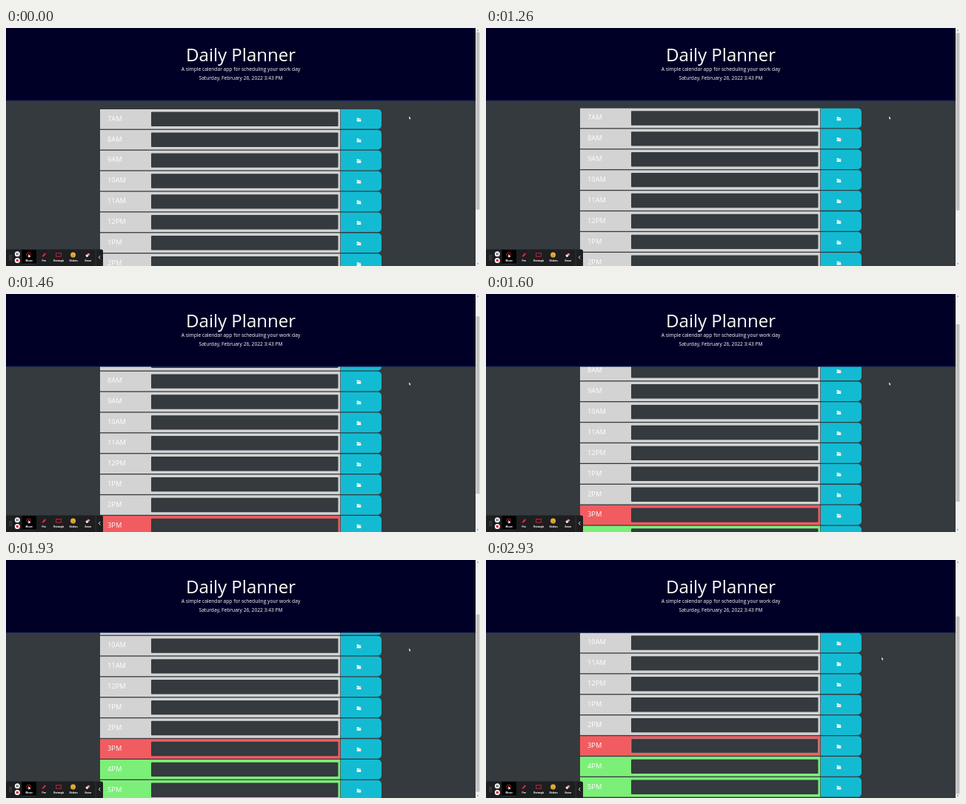
An HTML page for the animation above (3.4 s loop, 640 by 322 pixels).

```html
<!DOCTYPE html>
<html lang="en">
<head>
<meta charset="utf-8">
<title>Daily Planner</title>
<style>
  html, body { margin: 0; width: 100%; height: 100%; overflow: hidden; background: #343a3e; }
  svg { display: block; width: 100%; height: 100%; font-family: "Open Sans", "Noto Sans", sans-serif; fill: #fff; }
  .centered { text-anchor: middle; }
  .title { font-size: 24px; }
  .lead { font-size: 6.67px; }
  .hour { font-size: 9.33px; }
  .tool { font: 700 3.1px Roboto, Inter, sans-serif; text-anchor: middle; }
  .past { fill: #d3d3d3; }
  .present { fill: #f15c60; }
  .future { fill: #7cef78; }
  .field { fill: #343a3e; }
  .save { fill: #13bbd2; }
</style>
</head>
<body>
<svg viewBox="0 0 640 322">
  <defs>
    <linearGradient id="edge" x2="0" y2="1">
      <stop stop-color="#0a1c52"/>
      <stop offset="1" stop-color="#0a1c52" stop-opacity="0"/>
    </linearGradient>
    <path id="folder" d="M473.7 11.7h2.2l.7.8h2.5v1h-5.4zM473.7 14h5.6v2.6h-5.6z"/>
  </defs>

  <rect width="640" height="322" fill="#343a3e"/>
  <g id="rows"></g>

  <rect width="634" height="98" fill="#000027"/>
  <rect y="97.5" width="634" height="2" fill="url(#edge)"/>
  <g class="centered">
    <text class="title" x="317" y="45">Daily Planner</text>
    <text class="lead" x="317" y="58">A simple calendar app for scheduling your work day</text>
    <text class="lead" x="317" y="70">Saturday, February 26, 2022 3:43 PM</text>
  </g>

  <g id="scrollbar">
    <rect x="634" width="6" height="322" fill="#f1f1f1"/>
    <path d="M635.8 3.6l1.2-1.4 1.2 1.4zM635.8 318.4l1.2 1.4 1.2-1.4z" fill="#505050"/>
    <rect id="thumb" x="634.6" y="5.7" width="4.8" height="240" fill="#c1c1c1"/>
  </g>

  <g id="toolbar">
    <path d="M0 299.5H128.500a2.500 2.500 0 0 1 2.500 2.500V322H0z" fill="#1d1e20"/>
    <path d="M5 307v7.500M7.200 307v7.500" stroke="#85878a" stroke-width=".9" stroke-dasharray=".9 1.200"/>
    <circle cx="15.300" cy="305.800" r="3.500"/>
    <path d="M14.500 304.300v3M16.200 304.300v3" stroke="#222" stroke-width=".9"/>
    <circle cx="15.300" cy="314.500" r="3.500"/>
    <rect x="13.700" y="312.900" width="3.200" height="3.200" rx=".5" fill="#d8232f"/>
    <rect x="21.500" y="300" width="19.500" height="19" rx="1" fill="#000"/>
    <path d="M22 319.200h18.500" stroke="#43536b" stroke-width=".6"/>
    <circle cx="30.600" cy="306.700" r="2.800" fill="none" stroke="#d9303c" stroke-width=".8"/>
    <path d="M30.300 305.800v5l1.200-1.100 1.900-.1z"/>
    <path d="M48.700 309.700l.5-2 3.400-3.400 1.500 1.500-3.400 3.400z" fill="#e2263c"/>
    <rect x="67.700" y="304.600" width="6.600" height="4.600" fill="none" stroke="#c91f31" stroke-width="1"/>
    <circle cx="90.600" cy="307" r="3.400" fill="#f4b83b"/>
    <path d="M88.800 307.600q1.800 2.300 3.600 0" fill="none" stroke="#77451b" stroke-width=".7"/>
    <path d="M89.400 305.400v.8M91.800 305.400v.8" stroke="#583415" stroke-width=".7"/>
    <path d="M107.500 307.800l3.800-3.300 2.300 1.800-3.800 3.400h-1.200z" fill="#ef8b9b"/>
    <path d="M107.500 307.800l1.600-1.400 2.200 2-1.400 1.300h-1.200z" fill="#eee"/>
    <g class="tool">
      <text x="31.200" y="315.500">Mouse</text>
      <text x="51.300" y="315.500">Pen</text>
      <text x="71.200" y="315.500">Rectangle</text>
      <text x="91.200" y="315.500">Stickers</text>
      <text x="111" y="315.500">Eraser</text>
    </g>
    <path d="M121.200 300v22" stroke="#44464a" stroke-width=".6"/>
    <path d="M127.300 308l-2 2.200 2 2.200" fill="none" stroke="#fff" stroke-width=".9"/>
  </g>

  <path id="cursor" d="M0 0v4.300l1-.9.7 1.500.7-.3-.7-1.500h1.400z" stroke="#222" stroke-width=".35"/>
</svg>

<script>
  const LOOP = 3400;
  const FPS = 15;
  const ROW_PITCH = 27.9;
  const MAX_SCROLL = 95;
  const byId = id => document.getElementById(id);
  const clamp = v => Math.min(1, Math.max(0, v));
  const progress = (t, from, to) => clamp((t - from) / (to - from));
  const smooth = p => p * p * (3 - 2 * p);

  function rowMarkup(hour, index) {
    const state = hour < 15 ? "past" : hour === 15 ? "present" : "future";
    const label = (hour > 12 ? hour - 12 : hour) + (hour < 12 ? "AM" : "PM");
    return `<g transform="translate(0 ${110 + index * ROW_PITCH})">
      <rect class="${state}" x="127" width="324.3" height="26.6"/>
      <text class="hour" x="137" y="15.700">${label}</text>
      <rect class="field" id="field${hour}" x="196" y="3.600" width="252.500" height="19.400" rx="1"/>
      <path class="save" d="M452 0h50a5 5 0 0 1 5 5v16.600a5 5 0 0 1-5 5h-50z"/>
      <use href="#folder"/>
    </g>`;
  }

  byId("rows").innerHTML = Array.from({ length: 11 }, (_, i) => rowMarkup(i + 7, i)).join("");

  // Three wheel ticks; the last one reaches the end of the page.
  function scrollAt(t) {
    const tick = start => smooth(progress(t, start, start + 220)) * 33.1;
    return Math.min(MAX_SCROLL, tick(1240) + tick(1500) + tick(1785));
  }

  function draw(now) {
    const t = Math.floor((now % LOOP + 8) * FPS / 1000) * 1000 / FPS;
    const scroll = scrollAt(t);
    const move = smooth(progress(t, 2560, 2930));

    byId("rows").setAttribute("transform", `translate(0 ${-scroll})`);
    byId("thumb").setAttribute("y", 5.7 + scroll * 0.745);
    byId("cursor").setAttribute("transform", `translate(${544 - 10 * move} ${119.3 + 12 * move})`);
    byId("cursor").setAttribute("visibility", t > 50 && t < 1250 ? "hidden" : "visible");
    byId("field15").setAttribute("stroke", t > 2900 ? "#b9a3a5" : "none");
    byId("field15").setAttribute("stroke-width", 0.6);
  }

  const start = performance.now();
  function loop() {
    draw(performance.now() - start);
    requestAnimationFrame(loop);
  }
  loop();
</script>
</body>
</html>
```
